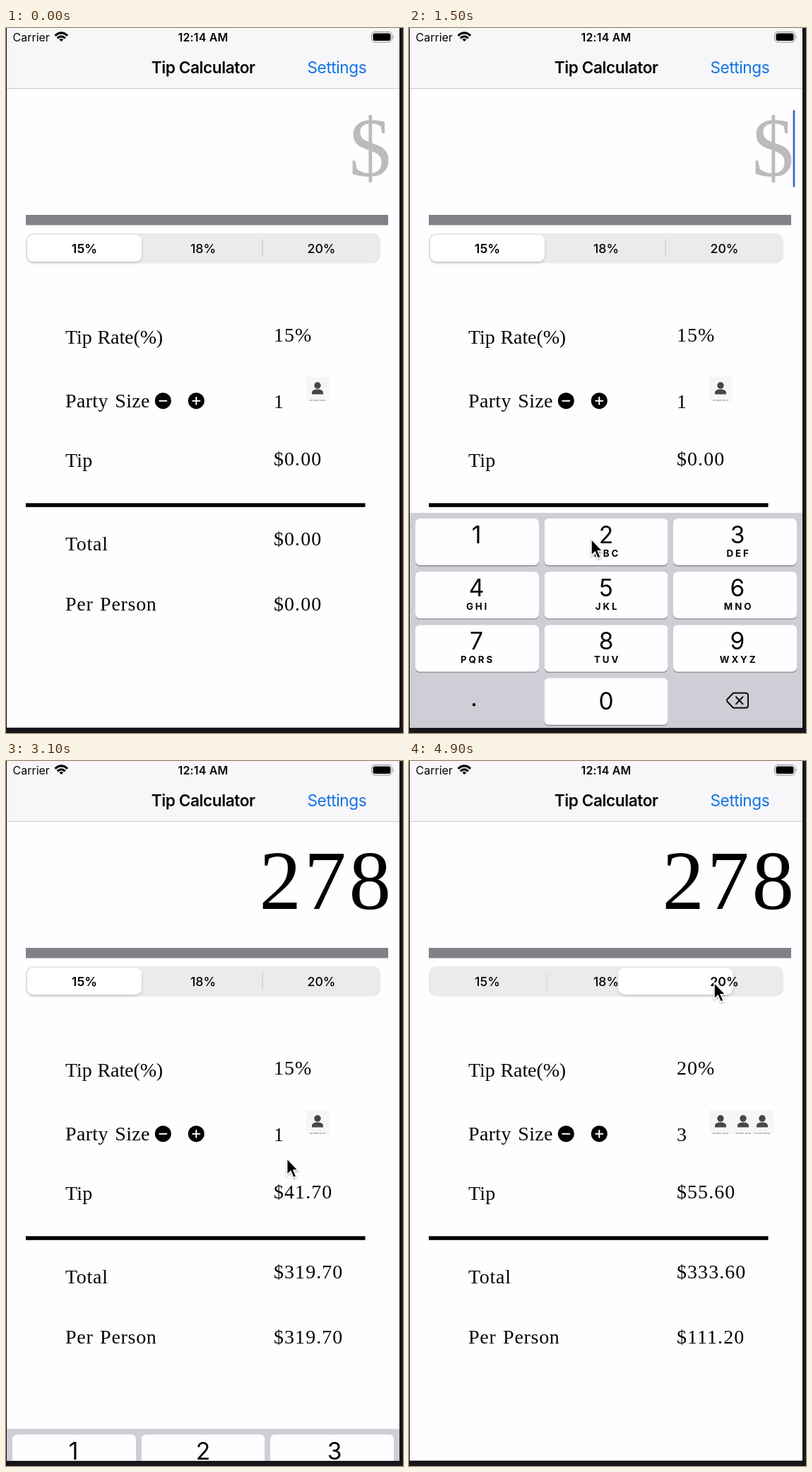
Animation of 562x996 px, one loop 5 s. Source, as an HTML page:

```html
<!DOCTYPE html>
<html lang="en">
<head>
<meta charset="utf-8">
<title>Tip Calculator</title>
<style>
  html, body { margin: 0; width: 100%; height: 100%; overflow: hidden; background: #17171b; }
  svg { display: block; width: 100%; height: 100%; }
  text { fill: #060608; white-space: pre; }
  .ui { font-family: Inter, Roboto, sans-serif; }
  .serif { font-family: "Liberation Serif", "Noto Serif", serif; font-size: 28px; }
  .mid { text-anchor: middle; }
  .nav { font-size: 22.7px; letter-spacing: -.45px; }
  .value { letter-spacing: 1.05px; }
  .seg { font-size: 17.8px; font-weight: 500; }
  .digit { font-size: 33.5px; }
  .abc { font-size: 13.3px; font-weight: 700; letter-spacing: 2.9px; }
  #amount { font-size: 119px; letter-spacing: 4px; text-anchor: end; }
</style>
</head>
<body>
<svg viewBox="0 0 562 996" preserveAspectRatio="none">
  <defs>
    <clipPath id="screen"><rect x="1" width="556" height="988.5"/></clipPath>
    <filter id="soft" x="-20%" y="-30%" width="140%" height="180%">
      <feDropShadow dx="0" dy="2" stdDeviation="2.2" flood-opacity=".17"/>
    </filter>
    <filter id="drop" x="-50%" y="-30%" width="200%" height="180%">
      <feDropShadow dx="0" dy="1.5" stdDeviation="1.3" flood-opacity=".35"/>
    </filter>
    <g id="person">
      <rect x="-16" y="493" width="32" height="34" fill="#f6f5f8"/>
      <circle cy="505" r="4.7" fill="#47474a"/>
      <path d="M-8 517.5v-2c0-3.300 3-5 8-5s8 1.700 8 5v2z" fill="#47474a"/>
      <path d="M-11 526H11" stroke="#8c8b8f" stroke-width="1" stroke-dasharray="4 1 7 1.500"/>
    </g>
  </defs>
  <rect width="562" height="996" fill="#17171b"/>
  <path d="M.5 0V989.500H557.500V0" fill="none" stroke="#050507"/>
  <g clip-path="url(#screen)">
    <rect x="1" width="556" height="989" fill="#fefdff"/>
    <rect x="1" width="556" height="85" fill="#f7f6f8"/>
    <rect x="1" y="85" width="556" height="1" fill="#cac9cc"/>

    <g class="ui">
      <text x="9.500" y="19" font-size="16">Carrier</text>
      <text class="mid" x="279" y="19" font-size="16" font-weight="600" letter-spacing=".15">12:14 AM</text>
      <text class="mid nav" x="279.200" y="64" font-weight="600">Tip Calculator</text>
      <text class="nav" x="426.500" y="64" style="fill:#1273e6">Settings</text>
    </g>
    <g fill="none" stroke="#060608" stroke-width="3">
      <path d="M69.500 10.800Q78.300 3 87.100 10.800"/>
      <path d="M72.700 14.300Q78.300 9.400 83.900 14.300"/>
      <path d="M75.300 16L78.300 19.300 81.300 16Q78.300 13.800 75.300 16Z" fill="#060608" stroke="none"/>
    </g>
    <rect x="517.500" y="5.500" width="29" height="14.500" rx="4.500" fill="none" stroke="#8d8c90"/>
    <rect x="519.500" y="7.500" width="25" height="10.500" rx="2.800"/>
    <path d="M548 10.500q2 2.200 0 4.500z" fill="#8d8c90"/>

    <text id="amount" class="serif" x="549" y="208.500"></text>
    <rect id="caret" x="543.600" y="116" width="2.700" height="109" rx="1.300" fill="#3a62d0"/>
    <rect x="28" y="264" width="513" height="14.500" fill="#838188"/>

    <rect x="28" y="290" width="502" height="42.500" rx="11" fill="#ebeaec"/>
    <rect id="sepA" x="194.500" y="299" width="1.300" height="24" fill="#cdccd0"/>
    <rect id="sepB" x="362.500" y="299" width="1.300" height="24" fill="#cdccd0"/>
    <rect id="pill" y="292" width="162" height="38" rx="9" fill="#fff" filter="url(#soft)"/>
    <g class="ui" id="segs"></g>

    <g class="serif" id="rows"></g>
    <rect x="28" y="671.300" width="480.500" height="5.500"/>
    <circle cx="222.300" cy="526.700" r="11.500"/>
    <circle cx="269.300" cy="526.700" r="11.500"/>
    <path d="M217.300 526.700h10M264.300 526.700h10M269.300 521.700v10" stroke="#fff" stroke-width="2" stroke-linecap="round"/>
    <g id="people"></g>

    <g id="board" class="ui">
      <rect x="1" y="685" width="556" height="306" fill="#cecfd6"/>
    </g>
    <path id="arrow" d="M0 0V23.200L5.200 18.200 9.200 27.300 13.200 25.500 9.300 16.700H16Z"
          fill="#000" stroke="#fff" stroke-width="1.500" filter="url(#drop)"/>
  </g>
</svg>
<script>
const LOOP = 5000, STEP = 100;
const $ = id => document.getElementById(id);

function add(parent, tag, attrs, content = '') {
  const el = document.createElementNS('http://www.w3.org/2000/svg', tag);
  for (const k in attrs) el.setAttribute(k, attrs[k]);
  el.textContent = content;
  return parent.appendChild(el);
}

// Segments
const segText = [['15%', 111], ['18%', 279], ['20%', 446.5]].map(([s, x]) =>
  add($('segs'), 'text', { class: 'seg mid', x, y: 317.5 }, s));

// Rows: label, label baseline, value baseline, letter and word spacing
const values = [
  ['Tip Rate(%)', 446, 443, -.1, 1],
  ['Party Size', 536, 537, .35, 2],
  ['Tip', 620, 617.5, .2, 0],
  ['Total', 738, 731, .7, 0],
  ['Per Person', 822.5, 822.5, .7, 2]
].map(([label, y, vy, ls, ws]) => {
  add($('rows'), 'text', { x: 84, y, style: `letter-spacing:${ls}px;word-spacing:${ws}px` }, label);
  return add($('rows'), 'text', { class: 'value', x: 379, y: vy });
});

const people = [441, 473, 500].map(x =>
  add($('people'), 'use', { href: '#person', x }));

// Number pad
const keys = {};
const letters = ['', 'ABC', 'DEF', 'GHI', 'JKL', 'MNO', 'PQRS', 'TUV', 'WXYZ'];
const colX = [9, 191.5, 374], colMid = [95.5, 279, 465];
function addKey(name, col, row, sub) {
  const y = 693 + row * 75.2, x = colX[col], size = { width: 175, height: 66, rx: 6.5 };
  add($('board'), 'rect', { x, y: y + 1.4, ...size, fill: '#898a90' });
  keys[name] = add($('board'), 'rect', { x, y, ...size });
  const base = row < 3 ? y + 35 : y + 44;
  add($('board'), 'text', { class: 'digit mid', x: colMid[col], y: base }, name);
  add($('board'), 'text', { class: 'abc mid', x: colMid[col] + 1.6, y: y + 54 }, sub);
}
letters.forEach((sub, i) => addKey(String(i + 1), i % 3, Math.floor(i / 3), sub));
addKey('0', 1, 3, '');
add($('board'), 'circle', { cx: 92, cy: 956, r: 2.2 });
add($('board'), 'path', {
  d: 'M459 939.500H476.500Q480 939.500 480 943V957Q480 960.500 476.500 960.500H459L450.500 951.500Q449.500 950 450.500 948.500ZM463 945L472.500 955M472.500 945L463 955',
  fill: 'none', stroke: '#0b0b0e', 'stroke-width': 2, 'stroke-linejoin': 'round', 'stroke-linecap': 'round'
});

// Timeline
const pointer = [
  [200, 552, 330], [400, 513, 223], [900, 513, 223], [1400, 258, 722], [1650, 258, 722],
  [1800, 143, 860], [1900, 133, 878], [2100, 133, 878], [2300, 272, 880], [2400, 272, 880],
  [2700, 424, 570], [2950, 424, 570], [3500, 280, 523], [4100, 280, 523],
  [4350, 284, 314], [4450, 284, 314], [4750, 432, 313], [LOOP, 432, 313]
];
const typed = [[0, ''], [1700, '2'], [2100, '27'], [2400, '278']];
const presses = [[1600, 1700, '2'], [1950, 2100, '7'], [2300, 2400, '8']];
const party = [[0, 1], [3600, 2], [4000, 3]];
const rates = [[0, 15], [4400, 18], [4850, 20]];
const carets = [[0, 0], [450, 1], [1100, 0], [1400, 1], [2900, 0]];

const at = (list, t) => list.filter(e => e[0] <= t).pop()[1];
const money = n => '$' + n.toFixed(2);

// Critically damped spring from 0 to 1
function spring(t, start) {
  const x = Math.max(0, t - start) * .01825;
  return 1 - (1 + x) * Math.exp(-x);
}

function pointerAt(t) {
  const i = Math.max(1, pointer.findIndex(p => p[0] >= t));
  const [t0, x0, y0] = pointer[i - 1], [t1, x1, y1] = pointer[i];
  const u = Math.min(1, Math.max(0, (t - t0) / (t1 - t0)));
  const e = u * u * (3 - 2 * u);
  return [x0 + (x1 - x0) * e, y0 + (y1 - y0) * e];
}

function draw(t) {
  const text = at(typed, t), bill = Number(text), rate = at(rates, t), size = at(party, t);
  const tip = bill * rate / 100, total = bill + tip;

  $('amount').textContent = text || '$';
  $('amount').style.fill = text ? '#000' : '#bbbabc';
  $('caret').style.opacity = at(carets, t);
  [rate + '%', size, money(tip), money(total), money(total / size)]
    .forEach((v, i) => { values[i].textContent = v; });
  people.forEach((p, i) => { p.style.display = i < size ? '' : 'none'; });

  const first = spring(t, 4390), second = spring(t, 4790);
  $('pill').setAttribute('x', 30 + 167 * (first + second));
  $('sepA').style.opacity = second;
  $('sepB').style.opacity = 1 - first;
  segText.forEach((s, i) => { s.style.fontWeight = [15, 18, 20][i] === rate ? 600 : 500; });

  const drop = 304 * (1 - spring(t, 415) + spring(t, 2915));
  $('board').setAttribute('transform', `translate(0 ${drop.toFixed(2)})`);
  const held = presses.find(p => t >= p[0] && t < p[1]);
  for (const k in keys) keys[k].setAttribute('fill', held && held[2] === k ? '#b5bfce' : '#fefdff');

  $('arrow').style.display = t < pointer[0][0] ? 'none' : '';
  $('arrow').setAttribute('transform', `translate(${pointerAt(t)})`);
}

function tick() {
  const t = performance.now() % LOOP;
  draw(Math.floor(t / STEP) * STEP);
  requestAnimationFrame(tick);
}
tick();
</script>
</body>
</html>
```
